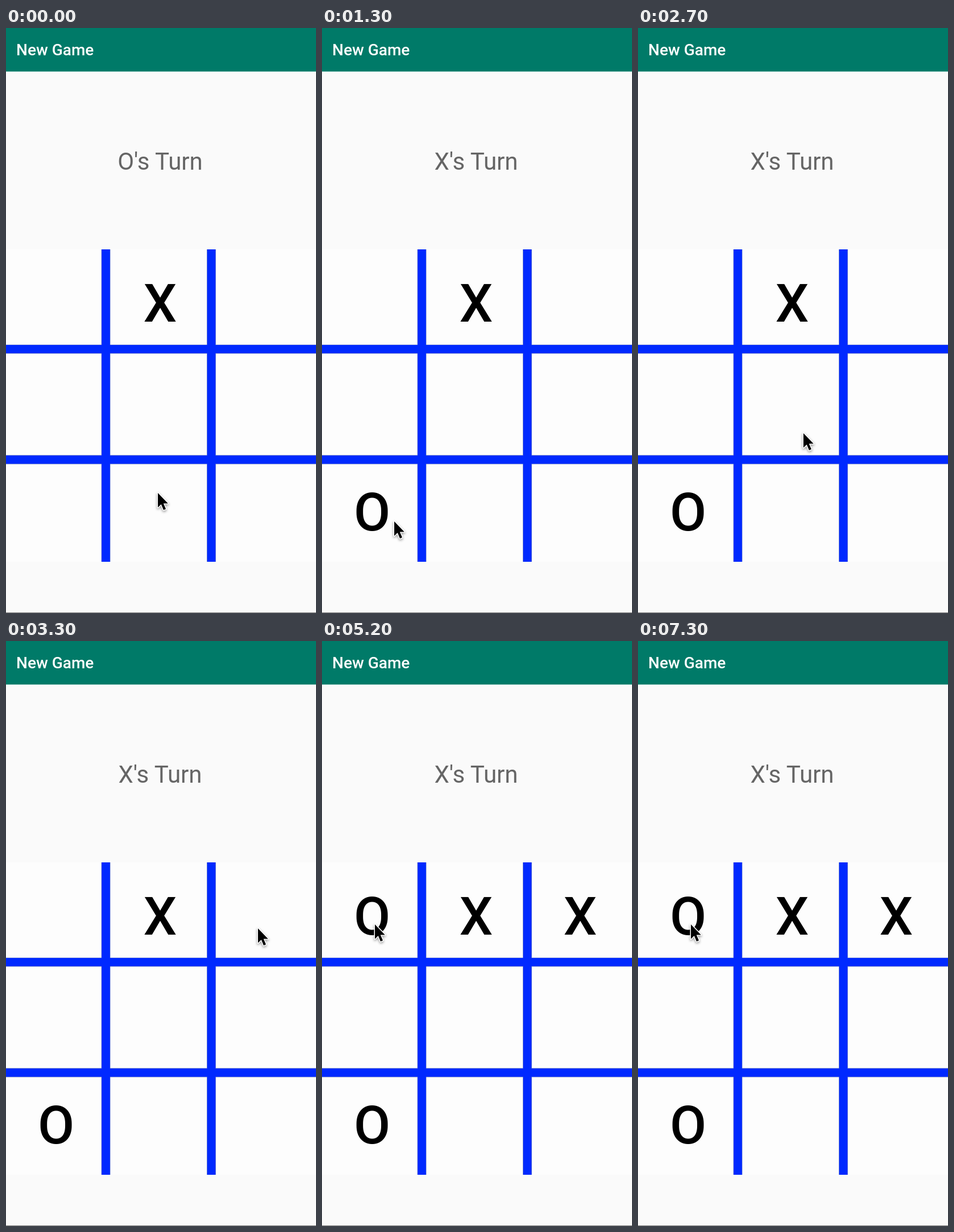
These frames come from a looping animation (545 by 1028 pixels, 8000 ms). An HTML page:

```html
<!DOCTYPE html>
<html lang="en">
<head>
<meta charset="utf-8">
<title>New Game</title>
<style>
  html, body { margin: 0; width: 100%; height: 100%; overflow: hidden; background: #fafafa; }
  svg { display: block; width: 100vw; height: 100vh; font-family: Roboto, sans-serif; }
  .title { font-size: 28px; font-weight: 500; fill: #fff; }
  #turn { font-size: 42px; fill: #656565; text-anchor: middle; }
  .mark { font-size: 93px; font-weight: 500; text-anchor: middle; }
  .grid { fill: none; stroke: #0029ff; stroke-width: 14.6; }
  .edge { stroke: #6f7fc0; stroke-width: 15.8; }
  #cursor { stroke: #fff; stroke-width: 3; stroke-linejoin: round; paint-order: stroke;
    filter: drop-shadow(0 2px 2px rgba(0, 0, 0, .4)); }
</style>
</head>
<body>
<svg viewBox="0 0 545 1028">
  <rect width="545" height="1028" fill="#fafafa"/>
  <rect width="545" height="76.5" fill="#007a68"/>
  <rect y="1027" width="545" height="1" fill="#777"/>
  <text class="title" x="18" y="48">New Game</text>
  <text id="turn" x="271" y="249"></text>
  <rect y="389" width="545" height="549" fill="#fdfdfd"/>
  <path class="grid edge" d="M175.5 389V938M361 389V938M0 564.3H545M0 758.5H545"/>
  <path class="grid" d="M175.5 389V938M361 389V938M0 564.3H545M0 758.5H545"/>
  <g id="marks"></g>
  <path id="cursor" d="M0 0V25.5L5.8 20L10 30L14 28.300L9.800 18.500H17.800Z"/>
</svg>
<script>
const LOOP = 8000, STEP = 100;
const $ = id => document.getElementById(id);

// Moves: time, player, column centre, baseline
const moves = [
  [0, 'X', 271, 516],
  [800, 'O', 88, 883],
  [3600, 'X', 454, 516],
  [5200, 'O', 88, 516]
];

// Pointer stops: time, x, y
const stops = [
  [0, 267, 817], [600, 127, 867], [2000, 127, 867], [2200, 251, 738],
  [2800, 294, 710], [3000, 372, 656], [3300, 443, 505], [3600, 443, 505],
  [3800, 441, 500], [4700, 441, 500], [5100, 93, 498], [LOOP, 93, 498]
];

const marks = moves.map(([, player, x, y]) => {
  const el = document.createElementNS('http://www.w3.org/2000/svg', 'text');
  el.setAttribute('class', 'mark');
  el.setAttribute('x', x);
  el.setAttribute('y', y);
  el.textContent = player;
  return $('marks').appendChild(el);
});

const ease = p => p * p * (3 - 2 * p);

function pointerAt(t) {
  const i = stops.findIndex(s => s[0] > t);
  const [t0, x0, y0] = stops[i - 1], [t1, x1, y1] = stops[i];
  const p = ease((t - t0) / (t1 - t0));
  return [x0 + (x1 - x0) * p, y0 + (y1 - y0) * p];
}

function draw(now) {
  const t = Math.floor(now % LOOP / STEP) * STEP;
  const played = moves.filter(m => m[0] <= t).length;
  marks.forEach((el, i) => el.setAttribute('visibility', i < played ? 'visible' : 'hidden'));
  $('turn').textContent = (played % 2 ? 'O' : 'X') + "'s Turn";
  $('cursor').setAttribute('transform', `translate(${pointerAt(t)})`);
}

let start;
function tick(now) {
  start ??= now;
  draw(now - start);
  requestAnimationFrame(tick);
}
draw(0);
requestAnimationFrame(tick);
</script>
</body>
</html>
```
